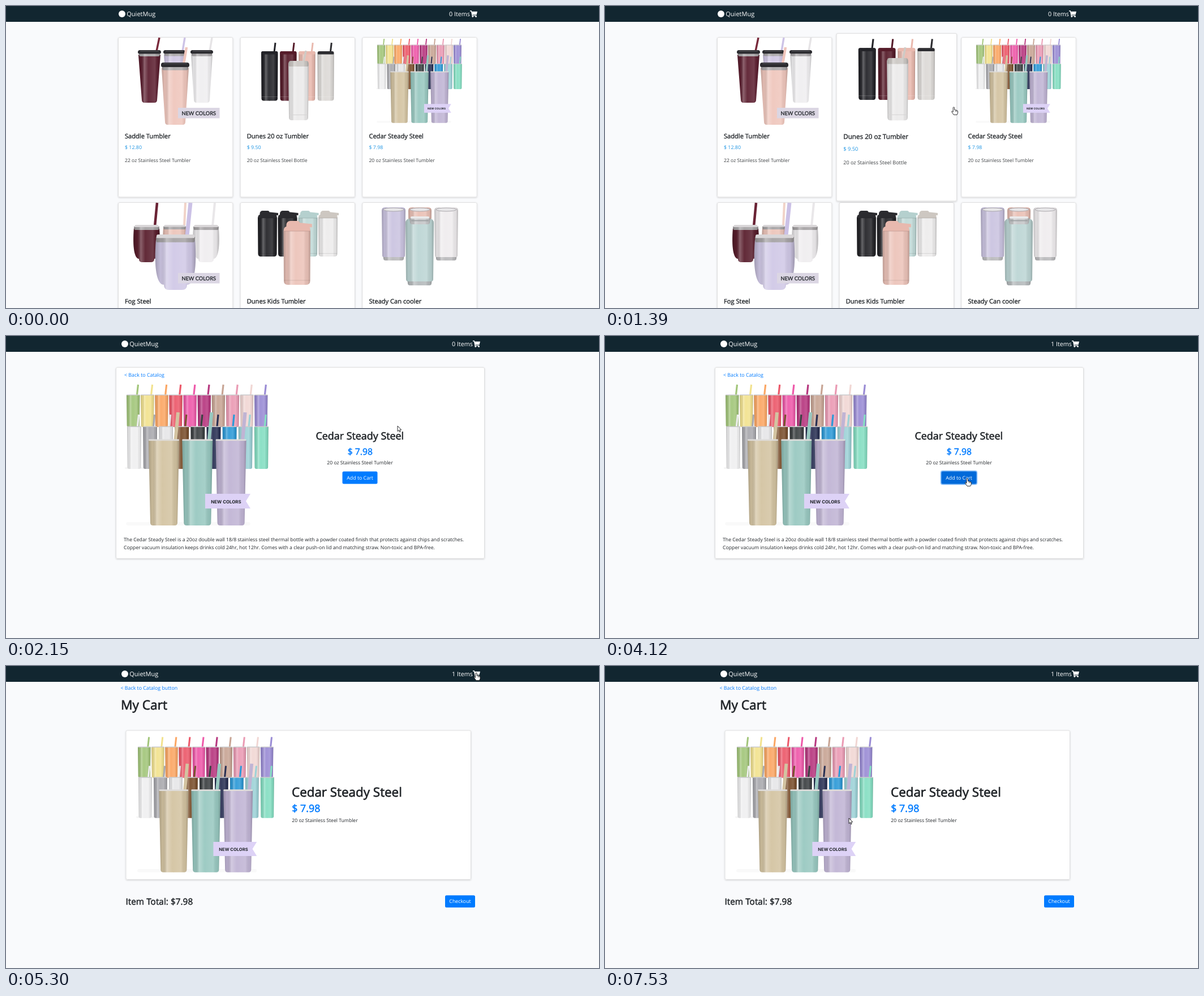
Recreate the animation shown at these times as an HTML page with a canvas. Size 1048 by 534 pixels, loop 8000 ms.

```html
<!DOCTYPE html>
<html lang="en">
<head>
<meta charset="utf-8">
<title>Drinkware shop</title>
<style>
html, body { margin: 0; width: 100%; height: 100%; overflow: hidden; background: #f9fafc; }
canvas { display: block; }
</style>
</head>
<body>
<canvas id="stage" width="1048" height="534"></canvas>
<script>
const ctx = document.getElementById('stage').getContext('2d');
ctx.textRendering = 'geometricPrecision';
const LOOP = 8000;
const INK = '#212529', BLUE = '#007bff', PAGE = '#f9fafc';
const FEATURED = 'Cedar Steady Steel';
const T = { loading: 1920, detail: 2150, added: 3730, cart: 5100 };

// "medium" thickens the regular face slightly.
function text(str, x, y, size, { color = INK, weight = 400, medium = false, align = 'left', font = 'Open Sans' } = {}) {
  ctx.font = `${weight} ${size}px "${font}", sans-serif`;
  ctx.textAlign = align;
  ctx.fillStyle = ctx.strokeStyle = color;
  ctx.fillText(str, x, y);
  if (!medium) return;
  ctx.lineWidth = size * .032;
  ctx.lineJoin = 'round';
  ctx.strokeText(str, x, y);
}

function rect(x, y, w, h, color, r = 0) {
  ctx.beginPath();
  ctx.roundRect(x, y, w, h, r);
  ctx.fillStyle = color;
  ctx.fill();
}

function poly(color, ...points) {
  ctx.beginPath();
  for (let i = 0; i < points.length; i += 2) ctx.lineTo(points[i], points[i + 1]);
  ctx.closePath();
  ctx.fillStyle = color;
  ctx.fill();
}

function panel(x, y, w, h) {
  ctx.save();
  ctx.shadowColor = 'rgba(0,0,0,.16)';
  ctx.shadowBlur = 3;
  ctx.shadowOffsetY = 1;
  rect(x, y, w, h, '#fff', 2.5);
  ctx.restore();
  ctx.beginPath();
  ctx.roundRect(x + .5, y + .5, w - 1, h - 1, 2.5);
  ctx.strokeStyle = '#dfdfe0';
  ctx.lineWidth = 1;
  ctx.stroke();
}

function straw(x1, y1, x2, y2, width, color) {
  ctx.beginPath();
  ctx.moveTo(x1, y1);
  ctx.lineTo(x2, y2);
  ctx.strokeStyle = color;
  ctx.lineWidth = width;
  ctx.stroke();
}

function sheen(x, w) {
  const g = ctx.createLinearGradient(x, 0, x + w, 0);
  g.addColorStop(0, 'rgba(0,0,0,.2)');
  g.addColorStop(.12, 'rgba(0,0,0,.06)');
  g.addColorStop(.27, 'rgba(255,255,255,.3)');
  g.addColorStop(.45, 'rgba(255,255,255,.06)');
  g.addColorStop(.75, 'rgba(255,255,255,.14)');
  g.addColorStop(.9, 'rgba(0,0,0,.05)');
  g.addColorStop(1, 'rgba(0,0,0,.22)');
  return g;
}

// Vessel with a straight taper or a belly, rounded corners and a sheen.
function cup(x, y, w, h, inset, color, { belly = 0, r = Math.min(3, w / 8), top = 0 } = {}) {
  const bottom = y + h, mid = x + w / 2;
  ctx.beginPath();
  ctx.moveTo(mid, y);
  for (const side of [-1, 1]) {
    const edge = d => mid + side * (w / 2 - d);
    const points = [
      [edge(top), y], [edge(0), y], [edge(0), y + top],
      [edge(-belly * 1.3), y + h * .55], [edge(inset * .1), y + h * .9],
      [edge(inset), bottom - r], [edge(inset), bottom], [edge(inset + r), bottom]
    ];
    ctx.moveTo(mid, y);
    ctx.lineTo(...points[0]);
    ctx.quadraticCurveTo(...points[1], ...points[2]);
    if (belly) ctx.bezierCurveTo(...points[3], ...points[4], ...points[5]);
    else ctx.lineTo(...points[5]);
    ctx.quadraticCurveTo(...points[6], ...points[7]);
    ctx.lineTo(mid, bottom);
    ctx.closePath();
  }
  // The two halves wind in opposite directions and share only the centre line.
  ctx.fillStyle = color;
  ctx.fill();
  ctx.fillRect(mid - .5, y, 1, h);
  ctx.fillStyle = sheen(x, w);
  ctx.fill();
}

function badge(y) {
  rect(304, y, 73.5, 18.5, '#dbd6e3');
  text('NEW COLORS', 340.7, y + 12.6, 9.3, { align: 'center', font: 'Lato', medium: true });
}

function liddedCup(x, y, w, h, inset, color) {
  const k = w / 41;
  cup(x + 1, y + 8 * k, w - 2, h - 8 * k, inset, color, { r: 5 });
  cup(x + 1.5, y + 4 * k, w - 3, 7 * k, .5, '#a9a6a8', { r: 3 });
  rect(x, y, w, 6.5 * k, '#2b2b2f', [4, 4, 3, 3]);
  rect(x + 4, y + 1.2, w - 8, 1.2, '#55555a', .6);
}

function travelSet() {
  straw(271, 56, 266, 80, 3.5, '#7a2a3c');
  straw(316, 56, 312, 80, 3.5, '#cdc3e6');
  straw(364, 56, 360, 80, 3.5, '#e6e4e6');
  liddedCup(233, 78, 41, 93, 6, '#5c1f30');
  liddedCup(278, 78, 39, 80, 5, '#cfc6e3');
  liddedCup(326, 78, 40, 93, 5, '#efeef0');
  straw(319, 73, 314, 103, 4.5, '#f0c5bb');
  liddedCup(274, 100, 50, 110, 6, '#efc6bc');
  badge(180);
}

function slimSet() {
  ['#242429', '#561c2a', '#e9b9ae', '#dcd9d6'].forEach((color, i) => {
    const x = 451 + i * 33.1, lid = i === 3 ? '#2d2d31' : color;
    straw(x + 25, 65, x + 23, 82, 3, lid);
    cup(x, 80, 29.5, 87.5, .5, color, { r: 4, top: 3 });
    rect(x + .5, 80, 28.5, 5.5, lid, [3, 3, 1, 1]);
    rect(x + .5, 160, 28.5, 1, 'rgba(255,255,255,.18)');
  });
  straw(530, 79, 526, 99, 3.5, '#cfcac5');
  cup(499, 99, 36, 103, 1, '#ebeaea', { r: 5, top: 4 });
  cup(499.5, 97, 35, 10, 0, '#cbc7c3', { r: 2, top: 4 });
  rect(500.5, 192, 33, 1, '#d5d4d4');
}

function steelSet() {
  const rows = [
    [5, 25.1, 23.5, 21, 57, 3, ['#a3c67b', '#f2e28f', '#fba765', '#ec5a6b', '#ee5aaa', '#b73980', '#c8a595', '#ea9bb4', '#f1d7d4', '#9b8dd5']],
    [6, 28.1, 25, 77, 75, 56, ['#efeff0', '#a9a9ae', '#e6e6e8', '#7a4f2d', '#3d4143', '#2a3154', '#2e9ad7', '#9dd2d7', '#85dec2']]
  ];
  rect(2, 149, 40, 3, 'rgba(0,0,0,.04)', 2);
  for (const [left, pitch, w, top, h, strawTop, colors] of rows) {
    colors.forEach((color, i) => {
      const x = left + i * pitch;
      straw(x + 20.5, strawTop, x + 18.5, top, 3.2, color);
      cup(x, top, w, h, .7, color);
      rect(x, top - .5, w, 1.6, '#c9c9cb', 1);
    });
  }
  rect(4, 246, 220, 6, 'rgba(0,0,0,.025)', 3);
  ['#d3c3a1', '#98c8c0', '#c0b4d4'].forEach((color, i) => {
    const x = 44 + i * 59.3;
    straw(x + 52, 52, x + 47.5, 101, 6, color);
    cup(x, 101, 54, 151, 3, color, { r: 5 });
    rect(x, 99.5, 54, 2.8, '#dedcda', 1.4);
  });
  poly('#ddd2f6', 144, 196, 224, 196, 216, 209, 224, 222, 144, 222);
  text('NEW COLORS', 181, 212.5, 7.9, { weight: 700, align: 'center', font: 'Inter' });
}

function steelImage(x, y, scale) {
  ctx.save();
  ctx.translate(x, y);
  ctx.scale(scale, scale);
  steelSet();
  ctx.restore();
}

function roundCup(x, y, w, h, inset, color) {
  const k = w / 45;
  cup(x, y + 6 * k, w, h - 6 * k, inset, color, { belly: 2 * k, r: 6 * k });
  cup(x, y + 3 * k, w, 6 * k, .5, '#a5a2a4', { r: 2 });
  rect(x + 1, y, w - 2, 4 * k, '#d9d6d8', [3, 3, 1, 1]);
}

function wineSet() {
  straw(267, 348, 263, 390, 4.5, '#6a2335');
  straw(317, 348, 315, 390, 4, '#f1d3c8');
  straw(369, 348, 365, 390, 4, '#e9e7e9');
  roundCup(226, 387, 45, 66, 9, '#581d2c');
  roundCup(278, 387, 40, 60, 8, '#ecc4b9');
  roundCup(331, 387, 45, 66, 9, '#efedef');
  straw(326, 348, 320, 406, 7, '#cbc1e6');
  roundCup(265, 404, 69, 98, 14, '#d0c8e6');
  badge(472);
}

function spoutBottle(x, y, w, h, color, lid) {
  const k = w / 34;
  cup(x, y + 10 * k, w, h - 10 * k, .5, color, { r: 5 * k, top: 3 * k });
  rect(x + 3.5 * k, y, 17 * k, 9 * k, lid, [5 * k, 3 * k, 0, 0]);
  poly(lid, x + 12 * k, y + 1.5 * k, x + w + 2 * k, y + 4 * k, x + w + 2 * k, y + 8 * k, x + 12 * k, y + 8 * k);
  rect(x + .5, y + 7 * k, w - 1, 6 * k, lid, [4 * k, 3 * k, 1, 1]);
  rect(x + 1, y + 12.5 * k, w - 2, 1, 'rgba(0,0,0,.14)');
  rect(x + 1, y + h - 6 * k, w - 2, 1, 'rgba(0,0,0,.1)');
}

function kidsSet() {
  spoutBottle(445, 362, 34, 81, '#242428', '#2b2b2f');
  spoutBottle(480.5, 362, 34, 81, '#242428', '#2b2b2f');
  spoutBottle(516.5, 362, 34, 81, '#c0d9d7', '#b5d0ce');
  spoutBottle(552, 362, 34, 81, '#edecec', '#cdc7c1');
  spoutBottle(490.5, 380, 47.5, 113, '#ecc3b9', '#e8b9ae');
}

function can(x, y, w, h, color) {
  cup(x + 2, y + h - 12, w - 4, 12, 1, '#b9b9bb', { r: 4 });
  cup(x, y, w, h - 6, 1, color, { r: 3, top: 6 });
  ctx.beginPath();
  ctx.ellipse(x + w / 2, y + 4, w / 2 - 3, 3, 0, 0, 7);
  ctx.fillStyle = '#e8e7e9';
  ctx.fill();
  ctx.strokeStyle = '#a9a6aa';
  ctx.lineWidth = 1;
  ctx.stroke();
}

function canSet() {
  can(664, 356, 42, 94, '#cac3e0');
  can(711, 356, 41, 80, '#e9bfb4');
  can(757, 356, 42, 94, '#efecee');
  cup(709, 482, 44, 12, 1, '#b4b9bb', { r: 4 });
  cup(706, 376, 50, 111, 1, '#bcd5d4', { r: 4, top: 8 });
  cup(713, 374, 37, 12, 1, '#c4c5c7', { r: 4, top: 3 });
  rect(715, 372, 33, 4, '#e9e9ea', 2);
  rect(716, 379, 31, 1.2, '#8f9496', 1);
}

const PRODUCTS = [
  ['Saddle Tumbler', '$ 12.80', '22 oz Stainless Steel Tumbler', travelSet],
  ['Dunes 20 oz Tumbler', '$ 9.50', '20 oz Stainless Steel Bottle', slimSet],
  [FEATURED, '$ 7.98', '20 oz Stainless Steel Tumbler', () => steelImage(653, 56.2, .597)],
  ['Fog Steel', '', '', wineSet],
  ['Dunes Kids Tumbler', '', '', kidsSet],
  ['Steady Can cooler', '', '', canSet]
].map(([name, price, note, paint], i) =>
  ({ name, price, note, paint, x: 198 + i % 3 * 215.7, y: i < 3 ? 55 : 347, w: 203.3, h: 283.3 }));

// Pointer path: time, tip x, tip y.
const PATH = [
  [210, 955, 522], [440, 650, 290], [600, 522, 190], [670, 509, 175], [980, 520, 198],
  [1250, 560, 190], [1500, 660, 170], [1700, 692, 159], [2860, 692, 159], [3150, 672, 196],
  [3490, 640, 252], [4120, 640, 252], [4420, 700, 185], [4890, 831, 12], [5450, 831, 12],
  [5800, 720, 80], [6210, 557, 181], [6560, 540, 300], [6800, 455, 401], [7060, 384, 330],
  [7140, 400, 275], [7220, 480, 268], [7300, 520, 340], [7380, 470, 424], [7460, 410, 350],
  [7530, 431, 269]
];

function pointer(t) {
  if (t < PATH[0][0]) return null;
  const i = PATH.findIndex(p => p[0] > t);
  if (i < 0) return PATH.at(-1).slice(1);
  const [t0, x0, y0] = PATH[i - 1], [t1, x1, y1] = PATH[i];
  const k = (t - t0) / (t1 - t0);
  return [x0 + (x1 - x0) * k, y0 + (y1 - y0) * k];
}

const inside = (p, x, y, w, h) => p && p[0] >= x && p[0] <= x + w && p[1] >= y && p[1] <= y + h;
const overCard = (p, c) => inside(p, c.x, c.y, c.w, c.h);
const overAdd = p => inside(p, 594.5, 239.5, 62, 22);

// Share of the last 150 ms spent over the card, used as transition progress.
function hoverAmount(card, t) {
  let hits = 0;
  for (let i = 0; i < 10; i++) hits += overCard(pointer(t - i * 15), card) ? 1 : 0;
  return hits / 10;
}

function drawCard(card, hover) {
  const { x, y, w, h, name, price, note, paint } = card;
  const scale = 1 + .05 * hover, cx = x + w / 2, cy = y + h / 2;
  ctx.save();
  ctx.translate(cx, cy);
  ctx.scale(scale, scale);
  ctx.translate(-cx, -cy);
  panel(x, y, w, h);
  paint();
  text(name, x + 12, y + 178.6, 11.1, { medium: true });
  text(price, x + 12, y + 198, 8.85, { color: '#1f95e3' });
  text(note, x + 12, y + 220.8, 8.63, { color: '#3d4043' });
  ctx.restore();
}

function catalog(t) {
  PRODUCTS.map(card => [card, hoverAmount(card, t)])
    .sort((a, b) => a[1] - b[1])
    .forEach(([card, hover]) => drawCard(card, hover));
}

function button(label, x, y, w, h, color = BLUE) {
  rect(x, y, w, h, color, 2.5);
  text(label, x + w / 2, y + h / 2 + 3.2, 8.8, { color: '#fff', align: 'center' });
}

function detail(t, p) {
  panel(194, 55, 652, 339);
  text('< Back to Catalog', 209, 71.5, 8.85, { color: BLUE });
  steelImage(208, 83, 1);
  const center = { align: 'center' };
  text(FEATURED, 625.3, 183, 17.9, { ...center, medium: true });
  text('$ 7.98', 625.8, 209.6, 15.7, { ...center, medium: true, color: BLUE });
  text('20 oz Stainless Steel Tumbler', 625.5, 227.3, 8.63, center);
  if (t >= T.added) rect(592.8, 237.8, 65.4, 25.4, '#86bdf8', 4);
  button('Add to Cart', 594.5, 239.5, 62, 22, overAdd(p) ? '#0069d9' : BLUE);
  text(`The ${FEATURED} is a 20oz double wall 18/8 stainless steel thermal bottle with a powder coated finish that protects against chips and scratches.`, 208, 362.6, 8.7);
  text('Copper vacuum insulation keeps drinks cold 24hr, hot 12hr. Comes with a clear push-on lid and matching straw. Non-toxic and BPA-free.', 208, 376.6, 8.7);
}

function cartPage() {
  text('< Back to Catalog button', 202.5, 42.4, 8.82, { color: BLUE });
  text('My Cart', 203, 77, 22.7, { medium: true });
  panel(211.5, 113.5, 610.5, 264.5);
  steelImage(228.2, 122.8, .96);
  text(FEATURED, 505, 230.6, 22.4, { medium: true });
  text('$ 7.98', 505.3, 258.2, 17.8, { medium: true, color: BLUE });
  text('20 oz Stainless Steel Tumbler', 505.3, 276.2, 8.63);
  text('Item Total: $7.98', 211.5, 421.5, 15.4, { medium: true });
  button('Checkout', 776, 405.5, 53, 21.5);
}

function cartIcon(x, y) {
  poly('#fff', x, y, x + 2.8, y, x + 3.3, y + 1.7, x + 13, y + 1.7, x + 11.6, y + 7.4,
    x + 4.5, y + 7.4, x + 4.7, y + 8.5, x + 11.2, y + 8.5, x + 11, y + 9.7, x + 3.6, y + 9.7,
    x + 1.9, y + 1.5, x, y + 1.5);
  rect(x + 3.4, y + 9.2, 2.8, 2.8, '#fff', 1.4);
  rect(x + 9.2, y + 9.2, 2.8, 2.8, '#fff', 1.4);
}

function header(t) {
  const dx = t < T.loading ? 0 : 5;
  rect(0, 0, 1048, 28, '#122630');
  rect(199 + dx, 8, 12, 12, '#fff', 6);
  text('QuietMug', 213.3 + dx, 18.3, 11, { color: '#fff' });
  text(`${t < T.added ? 0 : 1} Items`, 820 + dx, 18.3, 10.8, { color: '#fff', align: 'right' });
  cartIcon(820 + dx, 8);
}

const ARROW = [0, 0, 0, 9.6, 2.2, 7.5, 3.7, 10.8, 5.2, 10.1, 3.8, 7, 6.7, 6.9];
const HAND = [-1.2, .8, 0, 0, 1.2, .8, 1.3, 5, 3.4, 5.2, 5.4, 5.8, 7, 7, 7, 10.5, 5.6, 13.6,
  -.2, 13.6, -2.2, 10.6, -3.9, 8, -3, 7, -1.2, 8.6];

function drawPointer([x, y], hand) {
  ctx.save();
  ctx.translate(x, y);
  ctx.lineJoin = 'round';
  poly('#fff', ...(hand ? HAND : ARROW));
  ctx.strokeStyle = '#18181a';
  ctx.lineWidth = .9;
  ctx.stroke();
  if (hand) for (const fx of [3.2, 5]) straw(fx, 6, fx, 8.2, .7, '#18181a');
  ctx.restore();
}

const CLICKS = [[1700, 1910], [3650, 3880], [4970, 5200]];

function render(t) {
  const p = pointer(t);
  rect(0, 0, 1048, 534, PAGE);
  let hand = inside(p, 787, 5, 52, 17);
  if (t < T.loading) {
    catalog(t);
    hand ||= PRODUCTS.some(card => overCard(p, card));
  } else if (t >= T.cart) {
    cartPage();
  } else if (t >= T.detail) {
    detail(t, p);
    hand ||= overAdd(p);
  }
  header(t);
  if (!p) return;
  if (CLICKS.some(([from, to]) => t >= from && t < to)) {
    rect(p[0] - 8, p[1] - 6, 15, 15, 'rgba(236,218,40,.85)', 7.5);
  }
  drawPointer(p, hand);
}

const start = performance.now();
function frame() {
  render((performance.now() - start) % LOOP);
  requestAnimationFrame(frame);
}
frame();
</script>
</body>
</html>
```
